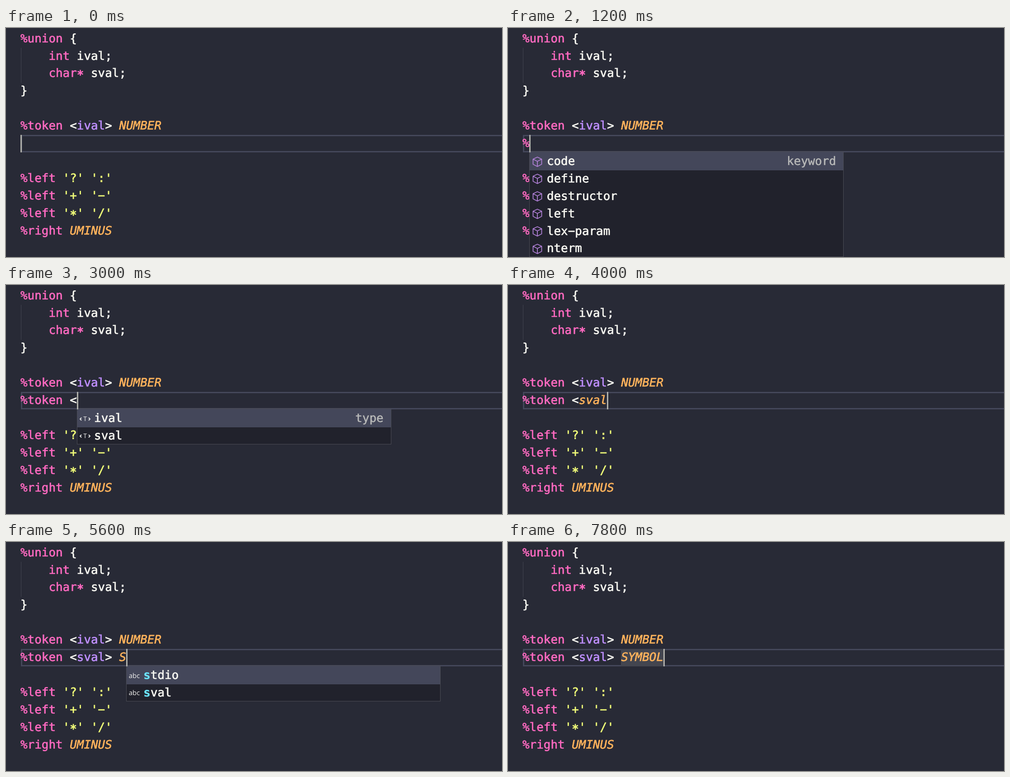
An HTML page for the animation above (8000 ms loop, 1098 by 510 pixels).

```html
<!DOCTYPE html>
<html lang="en">
<head>
<meta charset="utf-8">
<title>Grammar file completion</title>
<style>
  :root { --row: 38.9px; --selected: #44475a; }
  html, body { margin: 0; width: 100%; height: 100%; overflow: hidden; background: #282a36; }
  #stage {
    position: relative; width: 1098px; height: 510px; overflow: hidden;
    font: 25.91px/var(--row) "DejaVu Sans Mono", monospace; color: #f8f8f2;
    text-rendering: geometricPrecision; -webkit-text-stroke: .7px;
  }
  #stage > * { position: absolute; }
  pre { margin: 0; left: 32px; top: 4.6px; font: inherit; }
  .key { color: #ff6ac1; }
  .type { color: #bf8fff; }
  .name { color: #ffb35c; font-style: italic; }
  .str { color: #effa78; }
  .star { position: relative; top: 4px; -webkit-text-stroke: 1.2px; }
  .mark { display: inline-block; background: #43454f; }
  #current { left: 32.5px; top: 238px; width: 1080px; height: 33px; border: 3px solid var(--selected); }
  #guide { left: 33px; top: 44px; width: 1px; height: 78px; background: #42444f; }
  #caret { top: 238px; width: 3px; height: 38.5px; background: #b0b0ab; }
  #list { top: 275px; width: 694px; overflow: hidden; background: #21222c; border: 1px solid #4b4c55; }
  .item { position: relative; height: var(--row); padding-left: 37.5px; white-space: pre; }
  .item:first-child { background: var(--selected); border-top: 2px solid var(--selected); }
  .item:last-child { margin-bottom: -2px; }
  .item b { color: #6be5fd; -webkit-text-stroke: .3px; }
  .detail { position: absolute; right: 16px; color: #b9bab9; -webkit-text-stroke: .5px; }
  .item svg { position: absolute; left: 4px; top: 6.5px; width: 26px; height: 26px; overflow: visible; }
</style>
</head>
<body>
<div id="stage">
  <div id="current"></div>
  <div id="guide"></div>
  <pre><span class="key">%union</span> {
    <span class="key">int</span> ival;
    <span class="key">char<span class="star">*</span></span> sval;
}

<span class="key">%token</span> &lt;<span class="type">ival</span>&gt; <span class="name">NUMBER</span>
<span id="line"></span>

<span class="key">%left</span> <span class="str">'?' ':'</span>
<span class="key">%left</span> <span class="str">'+' '−'</span>
<span class="key">%left</span> <span class="str">'<span class="star">*</span>' '/'</span>
<span class="key">%right</span> <span class="name">UMINUS</span></pre>
  <div id="list"></div>
  <div id="caret"></div>
</div>
<script>
const LOOP = 8000, ORIGIN = 31.8, PITCH = 15.6;
const [line, list, caret] = ['line', 'list', 'caret'].map(id => document.getElementById(id));

const small = (text, size) => `<text x="13" y="18" text-anchor="middle" fill="#f0f0ee"
  font-family="Open Sans, sans-serif" font-size="${size}">${text}</text>`;
const icons = {
  keyword: `<path d="M13 2.5 22.5 7V18.5L13 23.5 3.5 18.5V7ZM3.5 7 13 12 22.5 7M13 12V23.5"
    fill="none" stroke="#b180d7" stroke-width="1.8" stroke-linejoin="round"/>`,
  type: small('T', 14) + `<path d="M5 10.5 2 13.5 5 16.5M21 10.5 24 13.5 21 16.5"
    fill="none" stroke="#f0f0ee" stroke-width="1.8"/>`,
  word: small('abc', 15)
};

const span = cls => text => `<span class="${cls}">${text}</span>`;
const key = span('key'), type = span('type'), name = span('name'), mark = span('mark');

// Completion list; the first `typed` letters of each entry are highlighted.
const popup = (kind, words, typed = 0) => words.split(' ').map((word, i) => `<div class="item">` +
  `<svg viewBox="0 0 26 26">${icons[kind]}</svg>` +
  (typed ? `<b>${word.slice(0, typed)}</b>` : '') + word.slice(typed) +
  (i || kind === 'word' ? '' : `<span class="detail">${kind}</span>`) + '</div>').join('');

const token = key('%token'), open = token + ' &lt;', closed = open + type('sval') + '&gt;';
const steps = [
  [0, ''],
  [600, key('%'), popup('keyword', 'code define destructor left lex−param nterm')],
  [1400, key('%') + 't', popup('keyword', 'token type', 1)],
  [1600, key('%') + 'to', popup('keyword', 'token', 2)],
  [1800, key('%') + mark('to'), popup('keyword', 'token', 2)],
  [2200, token],
  [2600, token + ' '],
  [3000, open, popup('type', 'ival sval')],
  [3600, open + name('s'), popup('type', 'sval', 1)],
  [4000, open + name('sval')],
  [4400, closed],
  [4600, closed + ' '],
  [5600, closed + ' ' + name('S'), popup('word', 'stdio sval', 1)],
  [5800, closed + ' ' + name('SY')],
  [6000, closed + ' ' + name('SYMB')],
  [6200, closed + ' ' + name('SYMBO')],
  [6400, closed + ' ' + name('SYMBOL')],
  [6800, closed + ' ' + mark(name('SYMBOL'))]
];

let shown;
function draw(now) {
  const step = steps.findLast(([start]) => start <= now % LOOP);
  if (step !== shown) {
    shown = step;
    const [, code, items = ''] = step;
    line.innerHTML = code;
    list.innerHTML = items;
    list.style.display = items ? 'block' : 'none';
    caret.style.left = list.style.left = ORIGIN + PITCH * line.textContent.length + 'px';
  }
  requestAnimationFrame(draw);
}
draw(performance.now());
</script>
</body>
</html>
```
